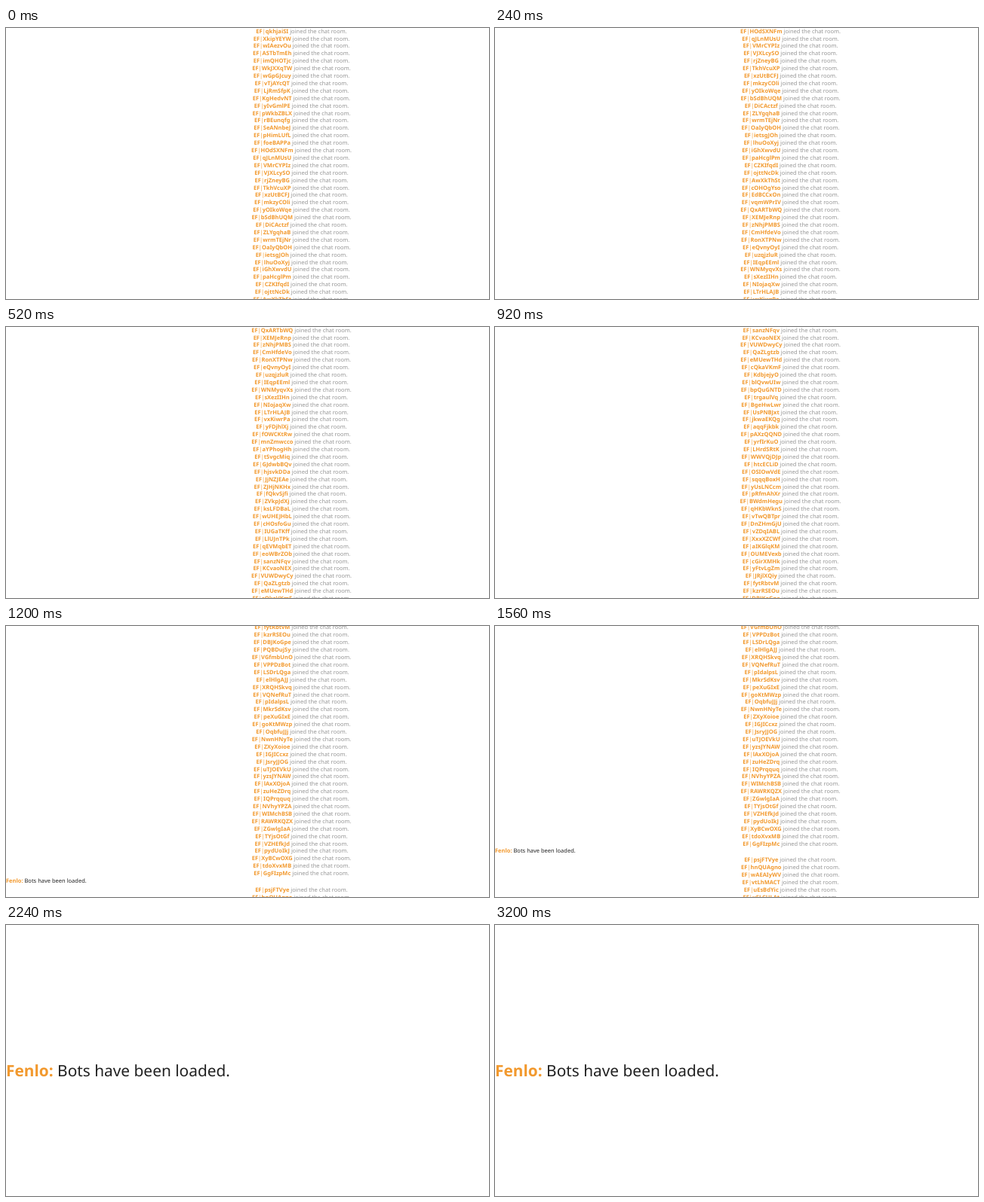
An HTML page with a canvas that plays this animation: 640 by 360 pixels, repeating every 3240 ms.

```html
<!DOCTYPE html>
<html lang="en">
<head>
<meta charset="utf-8">
<title>Chat room</title>
<style>
  html, body { margin: 0; width: 100%; height: 100%; overflow: hidden; background: #fff; }
  canvas { display: block; }
</style>
</head>
<body>
<canvas id="stage" width="640" height="360"></canvas>
<script>
const ctx = document.getElementById('stage').getContext('2d');
const LOOP = 3240, STEP = 40;
const PITCH = 9.9, FIRST_BASELINE = 6.6, ROWS = 37, CENTER = 391.5;
const MESSAGE_ROW = 139;
const ORANGE = '#f2992e', GRAY = '#969696', BLACK = '#222';
const FONT = '7.5px "Noto Sans", "Open Sans", sans-serif';
const BOLD = 'bold ' + FONT;

// [time in ms, index of the top line]
const SCROLL = [[40, 0], [240, 16], [520, 40], [920, 71], [1160, 104], [1560, 109]];
const ZOOM = { from: 1720, to: 2240, scale: 2.78, anchorY: 357.8 };

function random(seed) {
  return () => {
    seed = (seed + 0x6D2B79F5) | 0;
    let x = Math.imul(seed ^ (seed >>> 15), 1 | seed);
    x ^= x + Math.imul(x ^ (x >>> 7), 61 | x);
    return ((x ^ (x >>> 14)) >>> 0) / 4294967296;
  };
}

const LETTERS = 'ABCDEFGHIJKLMNOPQRSTUVWXYZabcdefghijklmnopqrstuvwxyz';
const rand = random(2024);
const names = Array.from({ length: 150 }, () =>
  Array.from({ length: 8 }, () => LETTERS[Math.floor(rand() * 52)]).join(''));

function topLine(t) {
  if (t <= SCROLL[0][0]) return 0;
  for (let k = 1; k < SCROLL.length; k++) {
    const [t0, a] = SCROLL[k - 1], [t1, b] = SCROLL[k];
    if (t <= t1) return Math.round(a + (b - a) * (t - t0) / (t1 - t0));
  }
  return SCROLL[SCROLL.length - 1][1];
}

function width(text, font) {
  ctx.font = font;
  return ctx.measureText(text).width;
}

// Draws [text, font, color] runs side by side, centered when a center is given.
function drawLine(runs, y, center) {
  const widths = runs.map(([text, font]) => width(text, font));
  let x = center ? center - widths.reduce((a, b) => a + b) / 2 : 0;
  runs.forEach(([text, font, color], k) => {
    ctx.font = font;
    ctx.fillStyle = color;
    ctx.fillText(text, x, y);
    x += widths[k];
  });
}

function draw(t) {
  const p = Math.min(1, Math.max(0, (t - ZOOM.from) / (ZOOM.to - ZOOM.from)));
  const scale = 1 + (ZOOM.scale - 1) * p * p * (3 - 2 * p);
  ctx.setTransform(1, 0, 0, 1, 0, 0);
  ctx.fillStyle = '#fff';
  ctx.fillRect(0, 0, 640, 360);
  ctx.setTransform(scale, 0, 0, scale, 0, ZOOM.anchorY * (1 - scale));
  ctx.textRendering = 'geometricPrecision';

  const top = topLine(t);
  const messageShown = MESSAGE_ROW < top + ROWS;
  for (let i = top; i < top + ROWS; i++) {
    // The message is a taller line, so it lifts everything above it.
    const lift = !messageShown ? 0 : i <= MESSAGE_ROW ? 2.2 : 0.5;
    const y = FIRST_BASELINE + PITCH * (i - top) - lift;
    if (i === MESSAGE_ROW) {
      drawLine([['Fenlo:', BOLD, ORANGE], [' Bots have been loaded.', FONT, BLACK]], y);
    } else {
      drawLine([
        ['EF', BOLD, ORANGE], ['|', FONT, ORANGE], [names[i], BOLD, ORANGE],
        [' joined the chat room.', FONT, GRAY]
      ], y, CENTER);
    }
  }
}

function frame() {
  draw(Math.floor((performance.now() % LOOP) / STEP) * STEP);
  requestAnimationFrame(frame);
}
frame();
</script>
</body>
</html>
```
